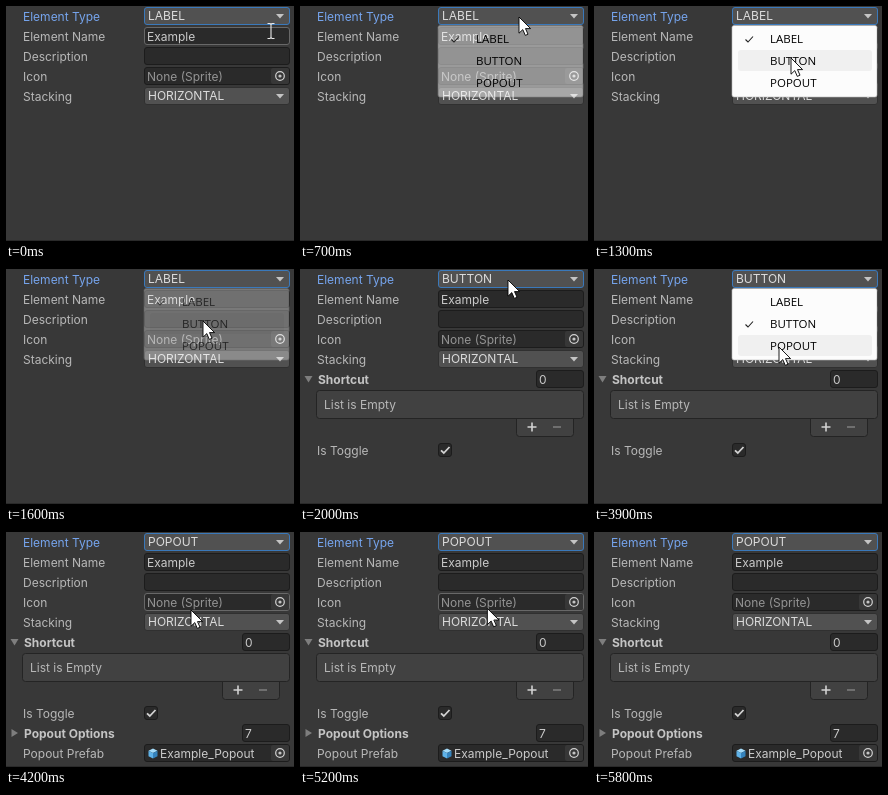
An HTML page for the animation above (6100 ms loop, 288x235 px).

```html
<!DOCTYPE html>
<html lang="en">
<head>
<meta charset="utf-8">
<title>Inspector dropdown</title>
<style>
  html, body { margin: 0; width: 100%; height: 100%; overflow: hidden; background: #383838; }
  svg { display: block; width: 288px; height: 235px; }
  text { font: 12px Inter, sans-serif; fill: #b8b8b8; white-space: pre; }
  .bold { font-weight: 700; fill: #c4c4c4; }
  .focus { fill: #76a5ee; }
  .value { fill: #dcdcdc; }
  .entry { fill: #cacaca; }
  .hint { fill: #949494; }
  .field { fill: #2a2a2a; stroke: #1c1c1c; }
  .field.hover { stroke: #686868; }
  .popup { fill: #515151; stroke: #303030; }
  .popup.active { stroke: #3a79bb; }
  .list { fill: #414141; stroke: #242424; }
  .icon { fill: #c4c4c4; }
  .line { fill: none; stroke: #d2d2d2; stroke-width: 1.6; }
  .menu text { font: 11.5px "Open Sans", sans-serif; fill: #000; }
</style>
</head>
<body>
<script>
const LOOP = 6100, STEP = 100;
const NS = "http://www.w3.org/2000/svg";

function add(parent, tag, attrs, content) {
  const el = document.createElementNS(NS, tag);
  for (const k in attrs) el.setAttribute(k, attrs[k]);
  if (content !== undefined) el.textContent = content;
  parent.append(el);
  return el;
}
const group = (parent, attrs) => add(parent, "g", attrs);
const text = (p, x, y, s, cls = "") => add(p, "text", { x, y, class: cls }, s);
const path = (p, d, cls, more) => add(p, "path", { d, class: cls, ...more });
const box = (p, x, y, w, h, cls, rx = 2.5) =>
  add(p, "rect", { x: x + .5, y: y + .5, width: w - 1, height: h - 1, rx, class: cls });
const show = (el, on) => el.style.display = on ? "" : "none";

const svg = add(document.body, "svg", { viewBox: "0 0 288 235", width: 288, height: 235 });
add(svg, "rect", { width: 288, height: 235, fill: "#383838" });
add(svg, "rect", { y: 234, width: 288, height: 1, fill: "#2a2a2a" });

const base = group(svg), button = group(svg), popout = group(svg);

// Rows are 18px high; y is the top of the row
const label = (p, y, s, cls) => text(p, 17, y + 13.5, s, cls);

function popup(y, value, active = "") {
  box(base, 138, y, 146, 18, "popup " + active);
  path(base, `M270 ${y + 7}h8l-4 4.5z`, "icon");
  return text(base, 142, y + 13, value, "value");
}

function entry(p, x, y, value, cls = "entry", indent = 3) {
  const f = box(p, x, y, 284 - x, 18, "field");
  text(p, x + indent, y + 14, value, cls);
  return f;
}

function objectField(p, y, ...content) {
  const f = entry(p, 138, y, ...content);
  add(p, "rect", { x: 265, y: y + 1, width: 18, height: 16, rx: 2, fill: "#373737" });
  add(p, "circle", { cx: 274, cy: y + 9, r: 4.3, class: "line", style: "stroke-width:1.2" });
  add(p, "circle", { cx: 274, cy: y + 9, r: 1.6, class: "icon" });
  return f;
}

function foldout(p, y, title, count, open) {
  path(p, open ? `M4.5 ${y + 6}h8l-4 6.5z` : `M5.5 ${y + 5}v8l6.5 -4z`, "icon", { opacity: .5 });
  text(p, 18, y + 13.5, title, "bold");
  entry(p, 236, y, count);
}

// Always visible rows
["Element Type", "Element Name", "Description", "Icon", "Stacking"].forEach((s, i) =>
  label(base, 1 + 20 * i, s, i ? "" : "focus"));
const typeValue = popup(1, "LABEL", "active");
const fields = [
  { top: 21, typed: true, el: entry(base, 138, 21, "Example") },
  { top: 41, typed: true, el: entry(base, 138, 41, "") },
  { top: 61, typed: false, el: objectField(base, 61, "None (Sprite)", "hint") }
];
popup(81, "HORIZONTAL");

// Button rows
foldout(button, 101, "Shortcut", "0", true);
path(button, "M216.5 149.5h57v15q0 3 -3 3h-51q-3 0 -3 -3z", "list");
box(button, 16, 121, 268, 29, "list", 3);
add(button, "rect", { x: 217, y: 150, width: 56, height: 1, fill: "#414141" });
text(button, 24, 140, "List is Empty");
path(button, "M227.5 158h9M232 153.5v9", "line");
path(button, "M253 158h8", "line", { opacity: .4 });
label(button, 172, "Is Toggle");
box(button, 138, 174, 14, 14, "field");
path(button, "M141 181.3l2.8 2.7l5.7 -6", "line", { style: "stroke-width:1.8" });

// Popout rows
foldout(popout, 192, "Popout Options", "7", false);
label(popout, 212, "Popout Prefab");
objectField(popout, 212, "Example_Popout", "entry", 16);
const cube = group(popout, { transform: "translate(147 221.5)" });
path(cube, "M0 -5l4.5 2.3l-4.5 2.3l-4.5 -2.3z", "", { fill: "#a5dcfa" });
path(cube, "M-4.5 -2.7l4.5 2.3v5.4l-4.5 -2.3z", "", { fill: "#5fb2e8" });
path(cube, "M4.5 -2.7l-4.5 2.3v5.4l4.5 -2.3z", "", { fill: "#3583bd" });

// Dropdown menu
const OPTIONS = ["LABEL", "BUTTON", "POPOUT"], PITCH = 22;
const menu = group(svg, { class: "menu" });
const sheet = group(menu), items = group(menu);
add(sheet, "rect", { x: 138, y: 19.5, width: 145, height: 71.5, rx: 2, fill: "#fcfcfc", stroke: "#b8b8b8", "stroke-width": .6 });
const glow = add(sheet, "rect", { x: 144, width: 134, height: 21, rx: 3, fill: "#f0f0f0" });
OPTIONS.forEach((s, i) => text(items, 176, 37 + PITCH * i, s));
const tick = path(items, "M151.5 33.5l2.5 2.5l5 -5.5", "", { fill: "none", stroke: "#222", "stroke-width": 1.1 });

// Pointers, both with the hot spot at 0,0
const arrow = path(svg, "M0 0V16.2L3.8 12.6L6.3 18.4L9 17.2L6.5 11.6H11.6Z", "",
  { fill: "#fff", stroke: "#000", "stroke-width": .9 });
const beam = path(svg, "M-3.5 -7.5h2.5l1 1l1 -1h2.5M0 -6.5v13M-3.5 7.5h2.5l1 -1l1 1h2.5", "",
  { fill: "none", stroke: "#e8e8e8", "stroke-width": 1.1 });

const clamp = k => Math.min(1, Math.max(0, k));
const smooth = k => k * k * (3 - 2 * k);
const accelerate = k => k * k;

const HOME = { x: 265, y: 25 };
const GLIDES = [
  { from: 0, to: 300, x: 219, y: 11 },
  { from: 800, to: 1300, x: 197, y: 52 },
  { from: 1700, to: 2000, x: 208, y: 11 },
  { from: 3100, to: 3600, x: 185, y: 78 },
  { from: 5100, to: 5800, x: 300, y: 0, ease: accelerate }
];
const PICKS = [
  { open: 700, lit: 1300, close: 1500, option: 1 },
  { open: 2900, lit: 3900, close: 4000, option: 2 }
];
const CLOSING = 200;

function pointerAt(t) {
  let { x, y } = HOME;
  for (const g of GLIDES) {
    const k = (g.ease || smooth)(clamp((t - g.from) / (g.to - g.from)));
    x += (g.x - x) * k;
    y += (g.y - y) * k;
  }
  return [x, y];
}

function menuAt(t) {
  let type = 0, fade = 0, lit = -1;
  for (const p of PICKS) {
    if (t >= p.close + CLOSING) type = p.option;
    else if (t >= p.open) {
      fade = clamp((t - p.open + STEP) / 200) * (1 - clamp((t - p.close + STEP) / (CLOSING + STEP)));
      if (t >= p.lit) lit = p.option;
    }
  }
  return { type, fade, lit };
}

function draw(time) {
  const t = Math.floor(time % LOOP / STEP) * STEP;
  const [x, y] = pointerAt(t);
  const { type, fade, lit } = menuAt(t);

  typeValue.textContent = OPTIONS[type];
  show(button, type > 0);
  show(popout, type > 1);

  sheet.setAttribute("opacity", fade);
  items.setAttribute("opacity", clamp(2 * fade));
  show(glow, lit >= 0);
  glow.setAttribute("y", 22 + PITCH * lit);
  tick.setAttribute("transform", `translate(0 ${PITCH * type})`);

  let typing = false;
  for (const { el, top, typed } of fields) {
    const over = !fade && x >= 138 && x < 284 && y >= top && y < top + 18;
    el.classList.toggle("hover", over);
    typing ||= over && typed;
  }
  show(arrow, !typing && x < 288);
  show(beam, typing);
  (typing ? beam : arrow).setAttribute("transform", `translate(${x} ${y})`);
}

const start = performance.now();
function frame() {
  draw(performance.now() - start);
  requestAnimationFrame(frame);
}
frame();
</script>
</body>
</html>
```
